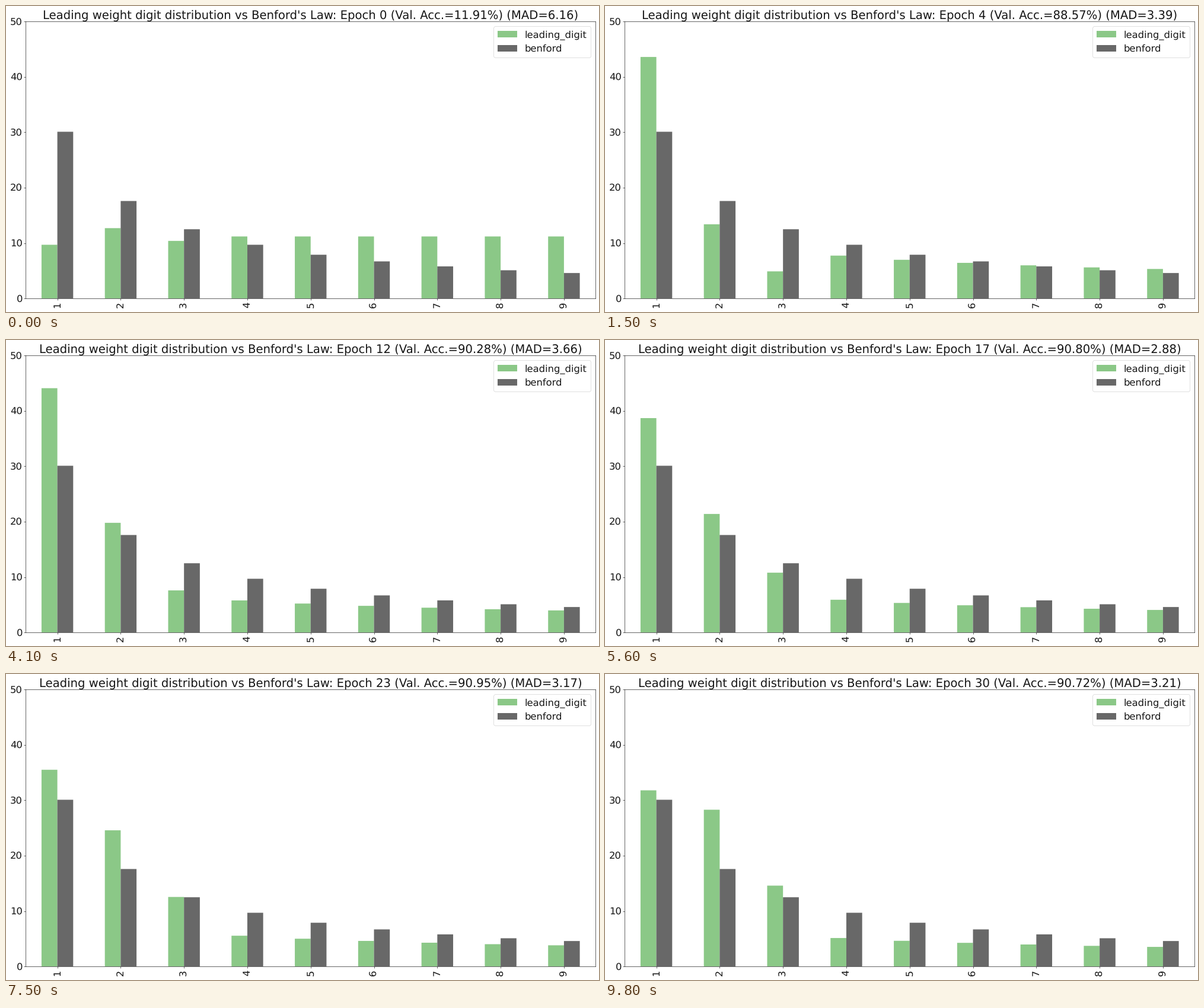
Animation, 1000 px wide and 517 px high, one loop 10 s. Source, as a matplotlib script:

```python
import numpy as np
import matplotlib.pyplot as plt
from matplotlib.animation import FuncAnimation

W, H, DPI = 1000, 517, 100
LEFT, RIGHT, TOP, BOTTOM = 33.2, 994.3, 26.2, 494.2
PT = 0.536  # chart unit in points
FRAMES, STEP_MS = 100, 100
LAST_EPOCH = 30
INK = "#161616"

DIGITS = np.arange(1, 10)
BENFORD = np.round(100 * np.log10(1 + 1 / DIGITS), 1)

# key points of the title's readings
READ_AT = [0, 4, 8, 12, 17, 23, 30]
ACCURACY = [11.91, 88.57, 89.97, 90.28, 90.80, 90.95, 90.72]
MAD = [6.16, 3.39, 3.23, 3.66, 2.88, 3.17, 3.21]

# key points of the first three bars; the others share what is left
HEAD_AT = [0, 4, 12, 17, 30]
HEAD = [[9.7, 43.6, 44.1, 38.7, 31.8],
        [12.7, 13.4, 19.8, 21.4, 28.3],
        [10.4, 4.9, 7.6, 10.8, 14.6]]

plt.rcParams.update({
    "font.family": "DejaVu Sans",
    "font.size": 22 * PT,
    "text.hinting": "none",
    "text.color": INK,
    "axes.linewidth": 0.8 * PT,
    "axes.titlepad": 6 * PT,
    "patch.linewidth": 1.0 * PT,
})
for axis in ("xtick", "ytick"):
    plt.rcParams.update({
        f"{axis}.labelcolor": INK,
        f"{axis}.major.size": 3.5 * PT,
        f"{axis}.major.width": 0.8 * PT,
        f"{axis}.major.pad": 3.5 * PT,
    })


def epoch_at(step):
    """Each epoch lasts 950/3 ms, rounded down to whole steps."""
    return min(max((300 * step + 299 - 900) // 950, 0), LAST_EPOCH)


def settle(epoch, power):
    """Training moves fastest in the first four epochs."""
    return 4 * (epoch / 4) ** power if epoch < 4 else epoch


def shares(epoch):
    head = [np.interp(settle(epoch, 0.35), HEAD_AT, row) for row in HEAD]
    tail = BENFORD[3:] ** (0.5 * min(epoch, 1))
    return [*head, *(tail / tail.sum() * (100 - sum(head)))]


fig = plt.figure(figsize=(W / DPI, H / DPI), dpi=DPI, facecolor="white")
ax = fig.add_axes([LEFT / W, 1 - BOTTOM / H,
                   (RIGHT - LEFT) / W, (BOTTOM - TOP) / H])

width = 0.25
style = dict(width=width, linewidth=0, snap=False)
bars = ax.bar(DIGITS - width / 2, BENFORD, color="#8bc887",
              label="leading_digit", **style)
ax.bar(DIGITS + width / 2, BENFORD, color="#686868",
       label="benford", **style)
ax.set_xlim(0.5, 9.5)
ax.set_ylim(0, 50)
ax.set_xticks(DIGITS)
ax.tick_params(axis="x", rotation=90)
ax.set_yticks(range(0, 51, 10))
ax.legend(loc="upper right")
title = ax.set_title("", fontsize=26.4 * PT)


def update(step):
    epoch = epoch_at(step)
    for bar, share in zip(bars, shares(epoch)):
        bar.set_height(share)
    acc = np.interp(settle(epoch, 0.1), READ_AT, ACCURACY)
    mad = np.interp(settle(epoch, 0.35), READ_AT, MAD)
    title.set_text("Leading weight digit distribution vs Benford's Law: "
                   f"Epoch {epoch} (Val. Acc.={acc:.2f}%) (MAD={mad:.2f})")
    return [*bars, title]


anim = FuncAnimation(fig, update, frames=FRAMES, interval=STEP_MS,
                     init_func=lambda: update(0), repeat=True,
                     repeat_delay=0, blit=False)
plt.show()
```
